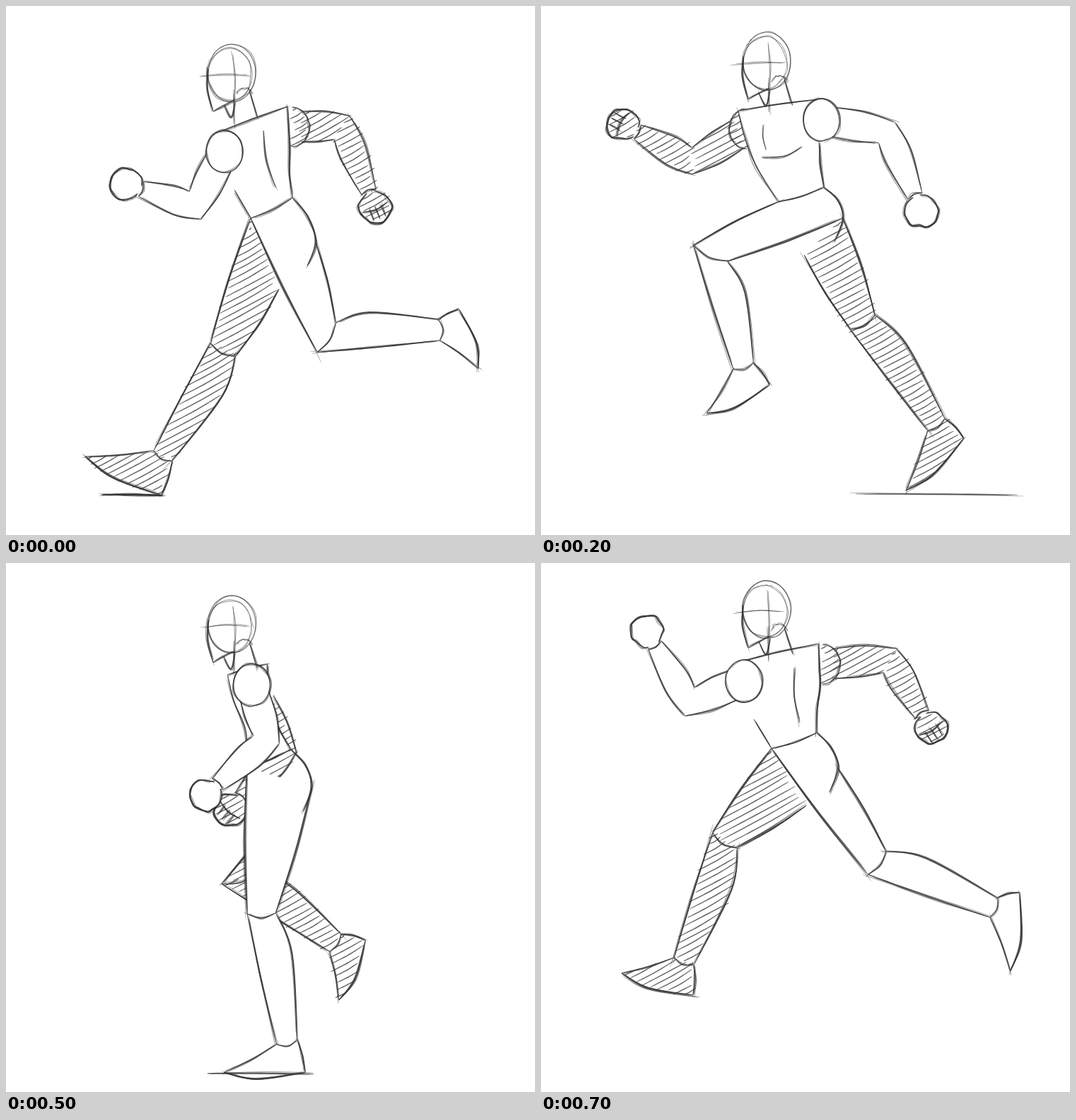
Write an HTML page that moves like this. It is 748 px wide and 748 px high and loops after 0.8 s.

```html
<!DOCTYPE html>
<html lang="en">
<head>
<meta charset="utf-8">
<title>Run cycle sketch</title>
<style>
html, body { margin: 0; width: 100%; height: 100%; overflow: hidden; background: #fff; }
svg { display: block; width: 100vw; height: 100vh; }
</style>
</head>
<body>
<svg id="stage" viewBox="0 0 748 748"></svg>
<script>
const NS = "http://www.w3.org/2000/svg";
const stage = document.getElementById("stage");
const STEP = 100, POSES = 8, INK = "#303030";

// Joints of the key poses. Arms: elbow, wrist. Legs: knee, ankle, toe, heel.
// "sink" is how far a foot moves down when its leg is the near one.
const contact = {
  head: 0,
  chest: [[309, 206], [404, 171]],
  hips: { front: [346, 300], back: [405, 271], seat: [438, 334], crotch: [386, 400] },
  arms: { lead: [[267, 282], [191, 259]], trail: [[475, 172], [513, 263]] },
  legs: {
    lead: { sink: 17, to: [[307, 486], [222, 636], [112, 637], [220, 692]] },
    trail: { sink: 16, to: [[451, 459], [609, 442], [664, 497], [637, 413]] }
  },
  ground: { leg: "lead", span: [135, 222], y: 691, weight: 3 }
};
const push = {
  head: -17,
  chest: [[291, 174], [397, 161]],
  hips: { front: [335, 277], back: [400, 256], seat: [427, 300], crotch: [372, 352] },
  arms: { lead: [[214, 219], [136, 178]], trail: [[489, 179], [529, 269]] },
  legs: {
    lead: { sink: -4, to: [[240, 352], [287, 513], [235, 580], [324, 540]] },
    trail: { sink: 19, to: [[455, 447], [559, 592], [516, 685], [598, 611]] }
  },
  ground: { leg: "trail", span: [445, 674], y: 690, weight: 1.5 }
};
const flight = {
  head: -29,
  chest: [[287, 167], [398, 143]],
  hips: { front: [326, 262], back: [390, 240], seat: [420, 290], crotch: [375, 343] },
  arms: { lead: [[210, 196], [161, 116]], trail: [[493, 138], [539, 214]] },
  legs: {
    lead: { sink: 0, to: [[260, 392], [202, 563], [114, 580], [215, 611]] },
    trail: { sink: 0, to: [[475, 424], [640, 487], [664, 577], [677, 466]] }
  }
};

// Vectors
const plus = (p, x, y) => [p[0] + x, p[1] + y];
const mix = (p, q, t = 0.5) => [p[0] + (q[0] - p[0]) * t, p[1] + (q[1] - p[1]) * t];
const along = (p, a, r) => plus(p, Math.cos(a) * r, Math.sin(a) * r);
const angle = (p, q) => Math.atan2(q[1] - p[1], q[0] - p[0]);
const dist = (p, q) => Math.hypot(q[0] - p[0], q[1] - p[1]);
const turn = (a, b) => Math.atan2(Math.sin(b - a), Math.cos(b - a));

const armChain = (pose, role) => [pose.chest[role === "lead" ? 0 : 1], ...pose.arms[role]];
const legChain = (pose, role) => [mix(pose.hips.front, pose.hips.seat), ...pose.legs[role].to];

// Halfway between two chains: every bone turns about its parent joint
function halfway(a, b) {
  const out = [mix(a[0], b[0])];
  for (let i = 1; i < a.length; i++) {
    const p = Math.min(i - 1, 2), from = angle(a[p], a[i]);
    const mid = from + turn(from, angle(b[p], b[i])) / 2;
    out.push(along(out[p], mid, (dist(a[p], a[i]) + dist(b[p], b[i])) / 2));
  }
  return out;
}

// While the limbs pass each other, the leading side becomes the trailing one
function passingPose() {
  const cross = (chain, from, to) => halfway(chain(contact, from), chain(push, to));
  const hips = {};
  for (const key in contact.hips) hips[key] = mix(contact.hips[key], push.hips[key]);
  const [l, r] = [0, 1].map(i => mix(contact.chest[i], push.chest[i]));
  const planted = cross(legChain, "lead", "trail");
  planted[1][0] -= 25;
  planted[3][1] = planted[4][1];
  return {
    side: true, head: -8, hips, chest: [mix(l, r, 0.25), mix(r, l, 0.25)],
    armChains: { lead: cross(armChain, "lead", "trail"), trail: cross(armChain, "trail", "lead") },
    legChains: { lead: planted, trail: cross(legChain, "trail", "lead") },
    sinks: { lead: 18, trail: 0 },
    ground: { leg: "lead", span: [285, 435], y: planted[4][1] + 1, weight: 2 }
  };
}

function rig(pose) {
  const both = f => ({ lead: f("lead"), trail: f("trail") });
  return {
    ...pose,
    armChains: both(role => armChain(pose, role)),
    legChains: both(role => legChain(pose, role)),
    sinks: both(role => pose.legs[role].sink)
  };
}
const cycle = [rig(contact), passingPose(), rig(push), rig(flight)];

// Pencil
let seed = 1, layer;
const rnd = () => (seed = seed * 16807 % 2147483647) / 2147483647;
const wobble = r => (rnd() * 2 - 1) * r;

function add(parent, tag, attrs) {
  const el = document.createElementNS(NS, tag);
  for (const key in attrs) el.setAttribute(key, attrs[key]);
  return parent.appendChild(el);
}

const pathOf = pts => "M" + pts.map(p => p[0].toFixed(1) + " " + p[1].toFixed(1)).join("L") + "Z";

// Catmull-Rom curve through the points
function smooth(pts) {
  const out = [], last = pts.length - 1;
  for (let i = 0; i < last; i++) {
    const a = pts[Math.max(i - 1, 0)], b = pts[i], c = pts[i + 1], d = pts[Math.min(i + 2, last)];
    for (let t = 0; t < 0.99; t += 0.125) {
      out.push([0, 1].map(k => b[k] + t / 2 * (c[k] - a[k] +
        t * (2 * a[k] - 5 * b[k] + 4 * c[k] - d[k] + t * (3 * (b[k] - c[k]) + d[k] - a[k])))));
    }
  }
  return [...out, pts[last]];
}

// One line, thinner at both ends
function pencil(pts, weight, opacity) {
  const line = smooth(pts), n = line.length - 1, left = [], right = [];
  line.forEach((p, i) => {
    const a = angle(line[Math.max(i - 1, 0)], line[Math.min(i + 1, n)]) + Math.PI / 2;
    const r = weight / 2 * (0.4 + 0.6 * Math.sqrt(Math.abs(Math.sin(Math.PI * i / n))));
    left.push(along(p, a, r));
    right.unshift(along(p, a, -r));
  });
  add(layer, "path", { d: pathOf(left.concat(right)), fill: INK, "fill-opacity": opacity });
}

// A main line with loose lines searching around it
function stroke(pts, weight = 2) {
  pencil(pts, weight, Math.min(0.9, 0.45 + weight * 0.17));
  for (let i = 0.8; i < weight; i += 0.6) {
    const loose = pts.map(p => plus(p, wobble(2.2), wobble(2.2)));
    loose[0] = mix(loose[0], loose[1], wobble(0.15));
    loose.push(mix(loose.pop(), loose[loose.length - 1], wobble(0.15)));
    pencil(loose, 1.2, 0.5);
  }
}

function arc(c, rx, ry, from, to) {
  return Array.from({ length: 13 }, (_, i) => {
    const a = from + (to - from) * i / 12;
    return plus(c, rx * Math.cos(a), ry * Math.sin(a));
  });
}

function loop(c, rx, ry, weight) {
  const start = rnd() * 6;
  stroke(arc(c, rx, ry, start, start + 6.6), weight);
}

// Parallel lines clipped to an area
function hatch(area, slope = -0.5, gap = 8.5) {
  const c = Math.cos(slope), s = Math.sin(slope);
  const pts = area.map(([x, y]) => [x * c + y * s, y * c - x * s]);
  const back = (x, y) => [x * c - y * s, x * s + y * c];
  const ys = pts.map(p => p[1]), end = Math.max(...ys);
  for (let y = Math.min(...ys) + gap / 2; y < end; y += gap + wobble(1)) {
    const hits = [];
    pts.forEach((p, i) => {
      const q = pts[(i + 1) % pts.length];
      if ((p[1] > y) !== (q[1] > y)) hits.push(p[0] + (y - p[1]) / (q[1] - p[1]) * (q[0] - p[0]));
    });
    hits.sort((a, b) => a - b);
    for (let i = 0; i + 1 < hits.length; i += 2) {
      const a = hits[i] - wobble(5), b = hits[i + 1] + wobble(5);
      if (b - a > 4) pencil([back(a, y), back((a + b) / 2, y + 0.7), back(b, y + wobble(1.5))], 1.5, 0.75);
    }
  }
}

const white = area => add(layer, "path", { d: pathOf(area), fill: "#fff" });
const shade = (area, near) => near ? white(area) : hatch(area);

// Anatomy: p and q are joined by a line that swells sideways
function bow(p, q, swell, at = 0.5) {
  return [p, along(mix(p, q, at), angle(p, q) + Math.PI / 2, swell), q];
}

// The two outline points at a joint, inner or front side first
function section(prev, joint, next, r) {
  const a = angle(prev, joint), bend = next ? turn(a, angle(joint, next)) / 2 : 0;
  const n = a + bend + Math.PI / 2, w = r / Math.cos(bend);
  return [along(joint, n, w), along(joint, n, -w)];
}

function tube(one, two, near, weight) {
  shade([...smooth(one), ...smooth(two).reverse()], near);
  stroke(one, weight);
  stroke(two, weight);
}

function arm([shoulder, elbow, wrist], near, facing) {
  const start = along(shoulder, angle(shoulder, elbow), 14);
  const s = section(shoulder, start, null, 21);
  const e = section(shoulder, elbow, wrist, 16.5);
  const w = section(elbow, wrist, null, 11);
  tube(bow(s[0], e[0], 2), bow(s[1], e[1], -4), near);
  tube(bow(e[0], w[0], 4, 0.35), bow(e[1], w[1], -7, 0.4), near);
  if (near) {
    white(arc(shoulder, 26, 30, 0, 6.28));
    loop(shoulder, 26, 30, 2);
  } else {
    const cap = arc(shoulder, 25 * facing, 28, -1.57, 1.57);
    hatch(cap);
    stroke(cap, 1.8);
  }
  fist(wrist, angle(elbow, wrist), near);
  stroke(bow(w[0], w[1], -3), 1.9);
}

function fist(wrist, a, near) {
  const c = along(wrist, a, 23), side = a + Math.PI / 2;
  const edge = arc(c, 23, 22, a + 3.5, a + 9.2).map(p => plus(p, wobble(2), wobble(2)));
  shade(edge, near);
  stroke(edge, 2.5);
  if (near) return;
  stroke(bow(along(c, side, 19), along(c, side, -19), 4), 2);
  for (const k of [-9, 0, 9]) {
    const knuckle = along(c, side, k);
    stroke([knuckle, along(knuckle, a, 18)], 1.6);
  }
}

function leg([hip, knee, ankle, toe, heel], hips, near, role) {
  const front = role === "lead" || near ? hips.front : hips.crotch;
  const rear = role === "trail" || near ? hips.seat : hips.crotch;
  const k = section(hip, knee, ankle, 20);
  const a = section(knee, ankle, null, 15);
  tube(bow(front, k[0], 3), bow(rear, k[1], -3), near, 2.3);
  tube(bow(k[0], a[0], 1), bow(k[1], a[1], -13, 0.33), near, 2.1);
  stroke(bow(k[0], k[1], 6), 1.9);

  const under = Math.sign(turn(angle(toe, heel), angle(toe, ankle))) * -9;
  const sole = bow(toe, heel, under, 0.4);
  shade([a[0], ...smooth(sole), a[1]], near);
  stroke(bow(a[0], toe, -2), 2);
  stroke(sole, 2.5);
  stroke(bow(a[1], heel, -2), 2.2);
  stroke(bow(a[0], a[1], 5), 1.6);
}

function torso({ chest: [l, r], hips, side }, leadNear) {
  const top = [plus(l, -12, -26), plus(r, -6, -29)];
  const flank = [plus(l, -3, 11), plus(l, 14, 54), hips.front];
  const back = [plus(r, -3, 32), mix(plus(r, -7, 32), hips.back), hips.back];
  white([...top, ...back, hips.front, ...flank.slice(0, 2).reverse()]);
  stroke(bow(...top, -1), 2);
  stroke(leadNear && !side ? flank.slice(1) : [top[0], ...flank], 1.9);
  stroke(leadNear || side ? [top[1], plus(r, -4, 4), ...back] : back, 2.3);
  if (side) return;
  if (leadNear) {
    stroke(bow(plus(r, -40, 5), plus(hips.back, -24, -14), 4), 1.8);
  } else {
    const mid = mix(l, r);
    stroke(bow(plus(mid, -30, 0), plus(mid, -26, 36), 2), 1.4);
    stroke([plus(mid, -32, 47), plus(mid, 0, 45), plus(mid, 24, 32)], 1.7);
  }
}

function pelvis({ front, back, seat }) {
  stroke(bow(front, back, 3), 2);
  stroke([back, along(mix(back, seat), angle(back, seat) - 1.57, 7), seat, plus(seat, -12, 34)], 2.3);
}

function head(dy) {
  const at = (x, y) => [x, y + dy];
  loop(at(319, 95), 34, 41, 1.2);
  loop(at(317, 97), 31, 37, 0.9);
  stroke([at(286, 88), at(285, 118), at(293, 149)], 2.1);
  stroke([at(293, 149), at(305, 142), at(323, 133)], 1.8);
  stroke([at(275, 99), at(310, 96), at(344, 98)], 1);
  stroke([at(321, 68), at(323, 100), at(324, 137)], 0.9);
  stroke(arc(at(337, 125), 11, 9, -3.1, 0), 1.1);
  stroke([at(308, 140), at(318, 158), at(324, 136)], 2);
  stroke([at(322, 118), at(322, 167)], 1.3);
  stroke([at(344, 120), at(356, 158)], 1.8);
}

function build(index) {
  const pose = cycle[index % 4], { hips, ground } = pose;
  const leadLegNear = index >= 2 && index <= 5;
  const isNear = role => (role === "lead") === leadLegNear;
  const sink = role => isNear(role) ? pose.sinks[role] : 0;
  const drawLeg = role => {
    const drop = sink(role);
    const chain = pose.legChains[role].map((p, i) => {
      const share = Math.min(i * 0.6, 1) * drop;
      return plus(p, share * 0.23, share);
    });
    leg(chain, hips, isNear(role), role);
  };
  const drawArm = role => arm(pose.armChains[role], !isNear(role), role === "lead" ? -1 : 1);
  const [near, far] = leadLegNear ? ["lead", "trail"] : ["trail", "lead"];

  seed = 97 + index * 31;
  layer = add(stage, "g", { visibility: "hidden" });
  drawArm(near);
  drawLeg(far);
  torso(pose, !leadLegNear);
  drawLeg(near);
  pelvis(hips);
  drawArm(far);
  head(pose.head);
  if (ground) {
    const y = ground.y + sink(ground.leg), [x1, x2] = ground.span;
    stroke([[x1, y], [(x1 + x2) / 2, y], [x2, y + 1]], ground.weight);
  }
  return layer;
}

const poses = Array.from({ length: POSES }, (_, i) => build(i));
let start = null;

function show(time) {
  const now = Math.floor(time / STEP) % POSES;
  poses.forEach((g, i) => g.setAttribute("visibility", i === now ? "visible" : "hidden"));
}

function tick(now) {
  if (start === null) start = now;
  show(now - start);
  requestAnimationFrame(tick);
}
show(0);
requestAnimationFrame(tick);
</script>
</body>
</html>
```
